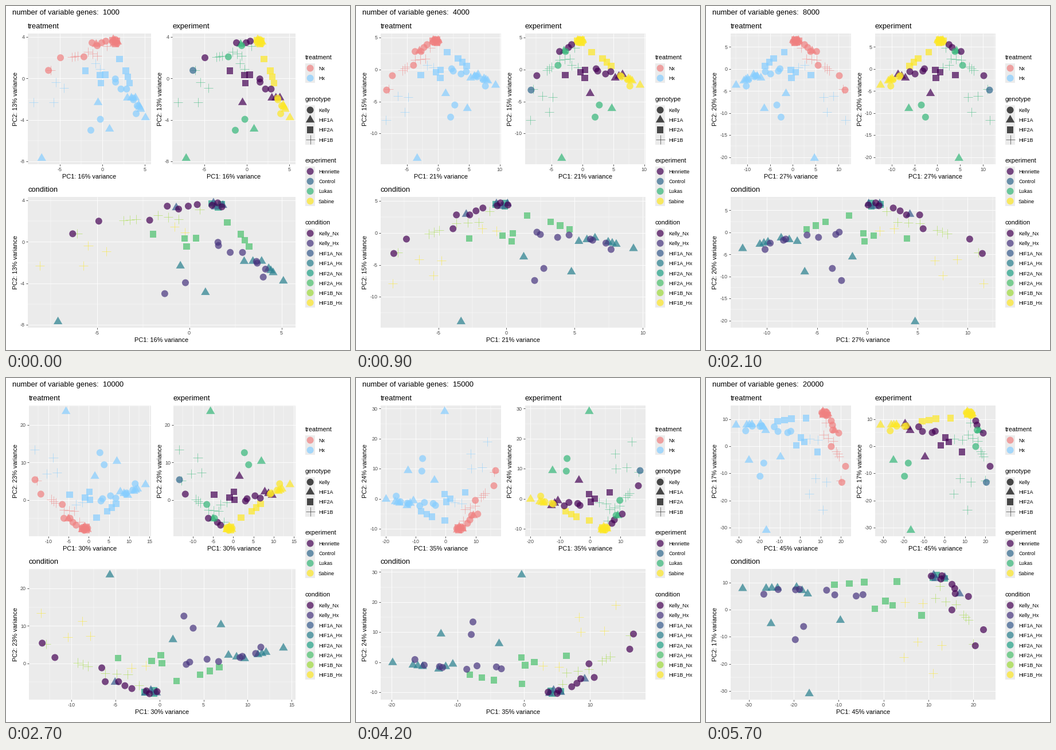
Write a matplotlib script that moves like this. It is 600x600 px and loops after 6 s.

```python
import numpy as np
import matplotlib.pyplot as plt
from matplotlib.animation import FuncAnimation
from matplotlib.patches import Circle, Polygon, Rectangle

SIZE, DPI = 600, 100
PT = 72 / DPI
RIGHT, WIDTH, HEIGHT = 505, 462, 228
R = 5.7
GREY = "#EBEBEB"
MARGIN = 1 / 22  # 5% expansion on each side of the data

plt.rcParams["font.family"] = "Liberation Sans"

TREATMENT = {"Nx": "#F08080", "Hx": "#87CEFF"}
PEOPLE = {"Henriette": "#440154", "Control": "#31688E",
          "Lukas": "#35B779", "Sabine": "#FDE725"}
CONDITION = {"Kelly_Nx": "#440154", "Kelly_Hx": "#46337E",
             "HIF1A_Nx": "#365C8D", "HIF1A_Hx": "#277F8E",
             "HIF2A_Nx": "#1FA187", "HIF2A_Hx": "#4AC16D",
             "HIF1B_Nx": "#9FDA3A", "HIF1B_Hx": "#FDE725"}
GENOTYPES = ["Kelly", "HIF1A", "HIF2A", "HIF1B"]
H, C, L, S = PEOPLE

# Key moments: the cloud tilts, its spread grows and the axes may mirror.
STEPS = [0, 3, 5, 9, 12, 16, 19]
TILT = [-.94, 0, 0, 0, 0, .95, 1.1]
MIRROR_X = [1, 1, -1, 1, -1, 1, -1]
MIRROR_Y = [1, 1, 1, -1, -1, 1, 1]
SPAN_X = [14.5, 19.45, 22.57, 30.27, 37.96, 42.19, 59]
SPAN_Y = [12.63, 20.48, 24.43, 34.91, 39.31, 47.69, 48.15]
ZERO_X = [.603, .475, .478, .49, .498, .421, .423]
ZERO_Y = [.656, .724, .735, .722, .704, .722, .689]
PC1 = [16, 21, 24, 30, 34, 36, 45]
PC2 = [13, 15, 17, 23, 24, 24, 17]

samples, spots = [], []


def trail(group, person, start, end=None, n=2):
    """Samples spaced evenly from start to end, or one at start."""
    for spot in np.linspace(start, end, n) if end else [start]:
        samples.append((group, person))
        spots.append(spot)


def cluster(group, phase):
    for k in range(3):
        a = phase + 2.1 * k
        trail(group, S, (212 + 11 * np.cos(a), 214 + 3 * np.sin(a)))


trail("HIF1B_Nx", L, (31, 131))
trail("HIF1B_Nx", L, (85, 163), (103, 169), 3)
trail("HIF1B_Nx", L, (133, 181), (172, 183), 3)
trail("HIF1B_Nx", L, (191, 202))
trail("HIF1B_Hx", L, (22, 77), (93, 91))
trail("HIF1B_Hx", L, (68, 119), (107, 117))
trail("HIF1B_Hx", L, (178, 172), (203, 168))

cluster("HIF2A_Nx", 3.1)
trail("HIF2A_Hx", H, (155, 155), (213, 160))
trail("HIF2A_Hx", H, (229, 150), (231, 164))
trail("HIF2A_Hx", S, (256, 195))
trail("HIF2A_Hx", S, (297, 184), (330, 171), 3)

trail("HIF1A_Nx", L, (150, 197))
cluster("HIF1A_Nx", .5)
trail("HIF1A_Hx", L, (141, 10.4), (333, 97))
trail("HIF1A_Hx", H, (250, 123))
trail("HIF1A_Hx", H, (346, 150), (374, 156), 3)
trail("HIF1A_Hx", S, (397, 149), (411, 145), 3)
trail("HIF1A_Hx", S, (441, 137.5))

trail("Kelly_Nx", C, (24, 129))
trail("Kelly_Nx", H, (46, 154), (133, 196))
trail("Kelly_Nx", H, (167, 203), (179, 208))
trail("Kelly_Nx", L, (127, 172), (156, 196))
cluster("Kelly_Nx", 1.8)
trail("Kelly_Hx", L, (269, 82), (285, 103))
trail("Kelly_Hx", H, (273, 166), (279, 162))
trail("Kelly_Hx", H, (309, 157), (329, 161))
trail("Kelly_Hx", S, (366, 154), (370, 152))
trail("Kelly_Hx", S, (393, 147), (402, 136))

BASE = np.array(spots).T / [[WIDTH], [HEIGHT]]

fig = plt.figure(figsize=(SIZE / DPI, SIZE / DPI), dpi=DPI, facecolor="white")
ax = fig.add_axes([0, 0, 1, 1])


def keyed(i, values):
    return np.interp(i, STEPS, values)


def fit(a):
    return MARGIN + (1 - 2 * MARGIN) * (a - a.min()) / np.ptp(a)


def cloud(i, sx, sy):
    """Sample positions as panel fractions, tilted, fitted and mirrored."""
    u, v = BASE
    tilt = keyed(i, TILT)
    x, y = fit(u - .65 * tilt * v), fit(v + .44 * tilt * u)
    return (x if sx > 0 else 1 - x), (y if sy > 0 else 1 - y)


def axis_range(i, spans, zeros, sign):
    span, zero = keyed(i, spans), keyed(i, zeros)
    lo, hi = -zero * span, (1 - zero) * span
    return (lo, hi) if sign > 0 else (-hi, -lo)


def ticks(lo, hi):
    """Major and minor grid values."""
    span = hi - lo
    step = 4 if span < 13 else 5 if span < 31 else 10
    halves = np.arange(np.ceil(2 * lo / step), np.floor(2 * hi / step) + 1).astype(int)
    return [k * step // 2 for k in halves if k % 2 == 0], [k * step / 2 for k in halves if k % 2]


def text(x, y, s, size, color="black", **kw):
    ax.text(x, y, s, fontsize=size * PT, color=color, va="baseline", **kw)


def line(xs, ys, color, width, **kw):
    ax.plot(xs, ys, color=color, lw=width * PT, solid_capstyle="butt", **kw)


def box(x, y, w, h):
    ax.add_patch(Rectangle((x, y), w, h, fc=GREY, lw=0, zorder=0))


def symbol(genotype, x, y, color):
    style = dict(fc=color, lw=0, alpha=.7, zorder=3)
    if genotype == "Kelly":
        ax.add_patch(Circle((x, y), R + .3, **style))
    elif genotype == "HIF1A":
        base = y + .778 * R
        ax.add_patch(Polygon([(x, y - 1.555 * R), (x + 1.347 * R, base),
                              (x - 1.347 * R, base)], **style))
    elif genotype == "HIF2A":
        ax.add_patch(Rectangle((x - R, y - R), 2 * R, 2 * R, **style))
    else:
        arm = 1.414 * R
        for dx, dy in ((arm, 0), (0, arm)):
            line([x - dx, x + dx], [y - dy, y + dy], color, .7, alpha=.7, zorder=3)


def legend(title, top, entries):
    text(522, top, title, 11)
    for k, (label, genotype, color) in enumerate(entries):
        y = top + 15.5 + 17.28 * k
        box(522, y - 8.64, 17.28, 17.3)
        symbol(genotype, 530.6, y, color)
        text(545, y + 3.2, label, 9)


def label_width(n):
    return 8.8 * (.556 * len(str(abs(n))) + (.333 if n < 0 else 0))


def panel(title, left, right, top, xr, yr, names, points):
    width, bottom = right - left, top + HEIGHT
    box(left, top, width, HEIGHT)

    def px(x):
        return left + width * (x - xr[0]) / (xr[1] - xr[0])

    def py(y):
        return bottom - HEIGHT * (y - yr[0]) / (yr[1] - yr[0])

    for xs, ys, lw in zip(ticks(*xr), ticks(*yr), (.85, .42)):
        for x in xs:
            line([px(x)] * 2, [top, bottom], "white", lw)
        for y in ys:
            line([left, right], [py(y)] * 2, "white", lw)
    for x in ticks(*xr)[0]:
        line([px(x)] * 2, [bottom, bottom + 2.75], "#333333", .85)
        text(px(x), bottom + 12.3, str(x), 9, "#4D4D4D", ha="center")
    for y in ticks(*yr)[0]:
        line([left - 2.75, left], [py(y)] * 2, "#333333", .85)
        text(left - 5, py(y) + 3.2, str(y), 9, "#4D4D4D", ha="right")

    text(left, top - 8.6, title, 13)
    text((left + right) / 2, bottom + 25, names[0], 11, ha="center")
    label_x = left - 10.7 - max(label_width(y) for y in ticks(*yr)[0])
    text(label_x, top + HEIGHT / 2, names[1], 11, ha="center",
         rotation=90, rotation_mode="anchor")
    for genotype, color, u, v in points:
        symbol(genotype, left + width * u, bottom - HEIGHT * v, color)


def draw(i):
    ax.clear()
    ax.set_xlim(0, SIZE)
    ax.set_ylim(SIZE, 0)
    ax.axis("off")

    near = np.argmin(np.abs(np.array(STEPS) - i))
    sx, sy = MIRROR_X[near], MIRROR_Y[near]
    xr = axis_range(i, SPAN_X, ZERO_X, sx)
    yr = axis_range(i, SPAN_Y, ZERO_Y, sy)
    left = 30.2 + max(label_width(y) for y in ticks(*yr)[0])
    names = [f"PC{k}: {keyed(i, pc):.0f}% variance" for k, pc in ((1, PC1), (2, PC2))]

    views = {"treatment": [], "experiment": [], "condition": []}
    for (group, person), u, v in zip(samples, *cloud(i, sx, sy)):
        genotype, oxygen = group.split("_")
        colors = TREATMENT[oxygen], PEOPLE[person], CONDITION[group]
        for view, color in zip(views.values(), colors):
            view.append((genotype, color, u, v))

    text(11, 15, f"number of variable genes:  {1000 * (i + 1)}", 13)
    places = [(left, 253, 48), (left + 252, RIGHT, 48), (left, RIGHT, 333)]
    for (title, points), place in zip(views.items(), places):
        panel(title, *place, xr, yr, names, points)

    legend("treatment", 93, [(n, "Kelly", c) for n, c in TREATMENT.items()])
    legend("genotype", 166, [(n, n, "black") for n in GENOTYPES])
    legend("experiment", 273, [(n, "Kelly", c) for n, c in PEOPLE.items()])
    legend("condition", 381, [(n, "Kelly", c) for n, c in CONDITION.items()])
    return []


anim = FuncAnimation(fig, draw, frames=20, interval=300, init_func=lambda: [],
                     repeat=True, repeat_delay=0)
plt.show()
```
